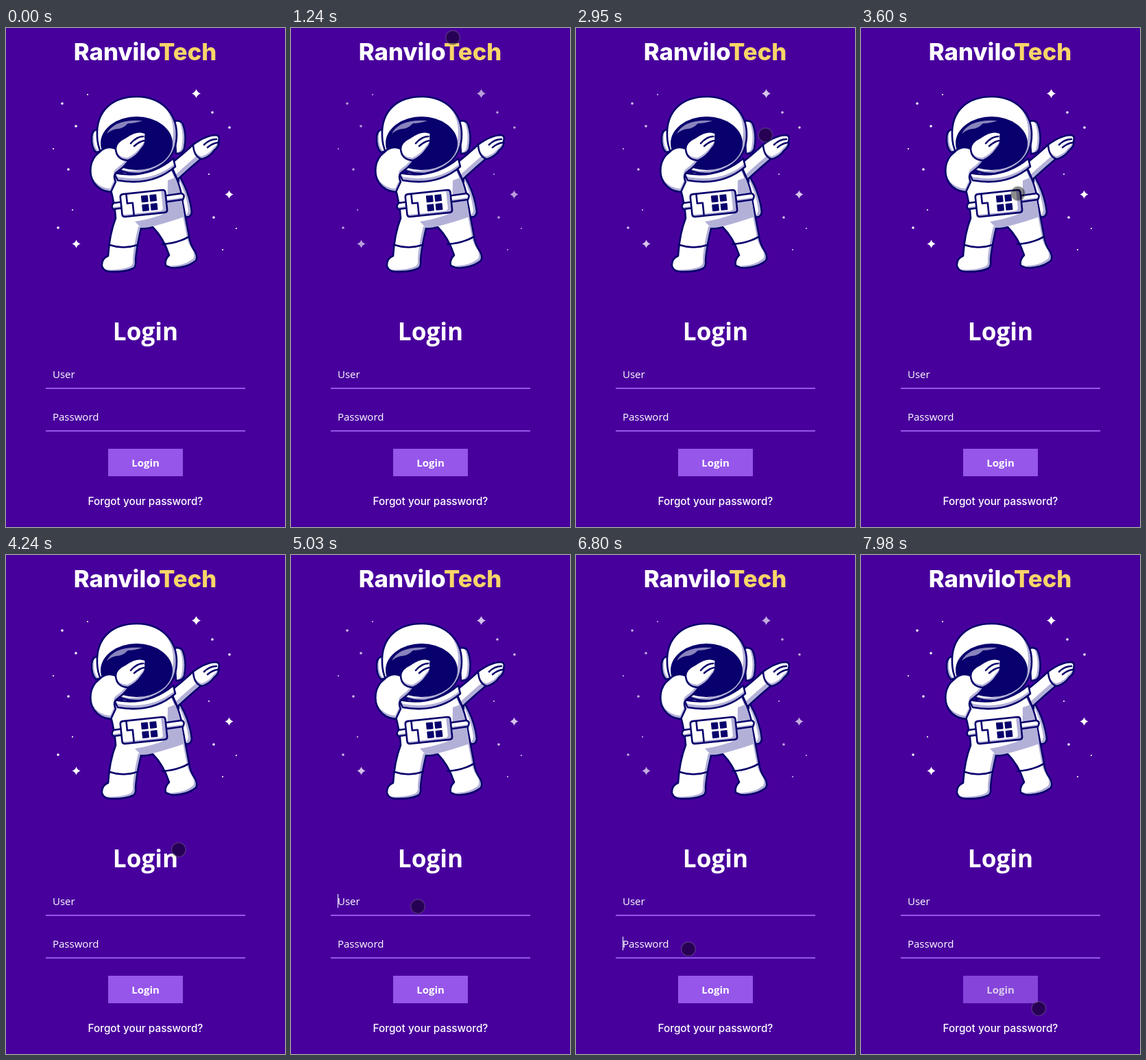
Animation of 407 by 727 pixels, one loop 8 s. Source, as an HTML page:

```html
<!DOCTYPE html>
<html lang="en">
<head>
<meta charset="utf-8">
<title>Login</title>
<style>
html, body { margin: 0; width: 100%; height: 100%; overflow: hidden; background: #48009d; }
svg { display: block; width: 100vw; height: 100vh; }
text { fill: #fff; font: 500 15px "Open Sans", sans-serif; }
.mid { text-anchor: middle; }
.brand { font: 800 34.7px Inter, sans-serif; }
.bold { font-weight: 700; }
.link { font: 500 15.3px Inter, sans-serif; }
#suit { fill: none; stroke-linejoin: round; stroke-linecap: round; }
.ink { stroke: #08006c; stroke-width: 2.6; }
.navy { fill: #08006c; }
.lit { fill: #fff; }
.shade { fill: #b3b0d8; }
</style>
</head>
<body>
<svg viewBox="0 0 407 727">
  <text id="brand" class="brand mid" x="203" y="47">Ranvilo<tspan fill="#f8d568">Tech</tspan></text>

  <g id="stars" fill="#fff" stroke="#fff" stroke-linecap="round">
    <path stroke-width="3.6" d="M82 110h0M102 143h0M91 206h0M76 291h0M301 123h0M326 145h0M303 276h0"/>
    <path stroke-width="2.2" d="M119 97h0M69 176h0M97 265h0M296 213h0M336 292h0M316 323h0"/>
  </g>
  <g id="suit"></g>

  <text class="mid bold" x="203.5" y="454.5" style="font-size:35.2px">Login</text>
  <text x="68" y="510">User</text>
  <text x="68" y="572">Password</text>
  <path d="M58 525H349M58 587H349" stroke="#9656ea" stroke-width="2"/>
  <rect id="userCaret" x="68" y="494" width="1" height="20" fill="#fff"/>
  <rect id="passCaret" x="68" y="556" width="1" height="20" fill="#fff"/>
  <g id="button">
    <rect x="149" y="613" width="109" height="40" fill="#9656ea"/>
    <text class="mid bold" x="203.5" y="639">Login</text>
  </g>
  <text class="mid link" x="203.5" y="695">Forgot your password?</text>

  <circle id="touch" r="10.3" fill="#000" fill-opacity=".45" stroke="#808080" stroke-opacity=".35" stroke-width="1.4"/>
</svg>
<script>
const LOOP = 8000;
const $ = id => document.getElementById(id);
const [brand, stars, suit, userCaret, passCaret, button, touch] =
  ["brand", "stars", "suit", "userCaret", "passCaret", "button", "touch"].map($);

// Four-pointed star
function spark(x, y, r) {
  const a = r * .25, b = r - a;
  return `<path stroke="none" d="M${x} ${y - r}q${a} ${b} ${r} ${r}q${-b} ${a} ${-r} ${r}q${-a} ${-b} ${-r} ${-r}q${b} ${-a} ${r} ${-r}z"/>`;
}
stars.innerHTML += spark(277.5, 95.5, 6.5) + spark(325.5, 242.5, 6) + spark(102.5, 314.5, 6);

// A shaded part: the lit side is the same shape moved by (dx, dy)
let parts = 0;
function part(d, dx = 0, dy = 0) {
  const id = "part" + parts++;
  return `<clipPath id="${id}"><path d="${d}"/></clipPath>
    <g clip-path="url(#${id})"><path class="shade" d="${d}"/>
    <path class="lit" d="${d}" transform="translate(${dx} ${dy})"/></g>
    <path class="ink" d="${d}"/>`;
}
const line = d => `<path class="ink" d="${d}"/>`;

const squares = [0, 1, 2, 3].map(i =>
  `<rect class="navy" x="${-3 + i % 2 * 12.5}" y="${-12 + (i >> 1) * 13}" width="10" height="10" rx="1"/>`).join("");

suit.innerHTML = [
  // backpack, right arm and hand
  part("M252 214Q268 240 271 268Q270 277 260 275L250 262Z", -5, -2),
  part("M240 198Q258 184 274 169L285 190Q266 206 250 221Z", -4, -6),
  part("M273 170Q292 156 307 156Q313 158 310 165Q312 172 304 178Q297 188 286 191Q274 188 273 170Z", -1, -4),
  line("M289 170Q297 162 307 162M294 174Q301 168 309 167"),
  // torso and legs
  part("M152 232Q159 258 160 277Q151 300 149 332Q139 336 140 347Q143 355 152 355Q174 356 186 350Q190 347 189 339Q190 322 197 292Q205 293 214 290Q230 306 238 331Q231 338 233 346Q241 351 250 349Q266 348 277 339Q280 334 276 326Q268 315 267 303L258 255Q256 235 248 218L240 200L160 212Z", -4, -3),
  `<path class="shade" d="M236 222L247 218Q256 240 260 275Q240 282 214 289L197 291L188 282Q222 276 235 268Z"/>`,
  line("M151 316Q171 323 192 316M228 315Q249 314 267 304"),
  // belt and control box
  part("M157 255Q152 261 157 264L258 250Q262 243 256 241Z", 0, -3),
  `<g transform="translate(201 256) rotate(-6)">`,
  part("M-29 -17h58q4 0 4 4v25q0 4-4 4h-58q-4 0-4-4v-25q0-4 4-4z", -6, -3),
  line("M-24 -16v13h8v17"), squares, `</g>`,
  // collar, ears, helmet, visor
  part("M157 211Q207 221 244 190L247 202Q213 231 163 222Z", 0, -5),
  part("M134 148Q126 148 125 158Q124 174 131 181L137 180Z", 3, -2),
  part("M245 136Q255 133 258 140Q264 156 260 176Q257 184 248 183Z", -4, -1),
  part("M133 158C131 118 158 100 191 100C226 100 249 124 249 155C249 185 232 205 195 212C160 214 134 190 133 158Z", -5, -4),
  `<ellipse class="navy" cx="190.5" cy="168" rx="52.5" ry="39"/>`,
  `<path class="shade" opacity=".75" d="M147 154Q158 132 199 135Q188 139 178 139Q170 147 162 147Q154 148 147 154Z"/>`,
  // left arm and hand
  part("M160 176Q146 170 135 182C122 192 120 212 128 225Q137 238 153 239L160 224Q155 214 163 209Q173 202 179 193Z", -1, -5),
  part("M160 176Q160 166 175 159Q190 149 200 152Q206 153 203 158Q206 168 198 176Q190 188 178 193Q161 192 160 176Z", -1, -4),
  line("M182 168Q191 158 200 158M187 172Q195 165 202 164"),
].join("");

// Touch path: time, x, y
const path = [[900, 375, 12], [1240, 236, 14], [1700, 232, 32], [2320, 303, 83], [2600, 302, 110],
  [3600, 229, 241], [4180, 257, 423], [5030, 185, 512], [5740, 164, 574], [6810, 164, 574],
  [7250, 190, 615], [8000, 261, 662]];

const clamp = v => Math.max(0, Math.min(1, v));
const ease = v => (1 - Math.cos(Math.PI * clamp(v))) / 2;
// Rises at `on`, falls at `off`, each over `d` ms
const pulse = (t, on, off, d) => ease((t - on) / d) - ease((t - off) / d);
const show = (el, on) => el.setAttribute("visibility", on ? "visible" : "hidden");
const blink = (t, from, to) => t >= from && t < to && (t - from) % 1000 < 500;

function touchAt(t) {
  const i = Math.max(1, path.findIndex(p => p[0] > t));
  const [t0, x0, y0] = path[i - 1], [t1, x1, y1] = path[i];
  const k = clamp((t - t0) / (t1 - t0));
  return [x0 + (x1 - x0) * k, y0 + (y1 - y0) * k];
}

function draw(t) {
  const fromDim = Math.abs(t % 4000 - 1980);
  stars.setAttribute("opacity", .33 + .67 * ease(fromDim / 1600));

  const zoom = 1 + .097 * pulse(t, 1270, 2330, 350);
  brand.setAttribute("transform", `translate(203 35) scale(${zoom}) translate(-203 -35)`);
  button.setAttribute("opacity", 1 - .2 * ease((t - 7200) / 300));

  show(userCaret, blink(t, 5020, 6320));
  show(passCaret, blink(t, 6320, LOOP));

  show(touch, t >= path[0][0]);
  const [x, y] = touchAt(t);
  touch.setAttribute("cx", x);
  touch.setAttribute("cy", y);
}

const start = performance.now();
function tick() {
  draw((performance.now() - start) % LOOP);
  requestAnimationFrame(tick);
}
tick();
</script>
</body>
</html>
```
